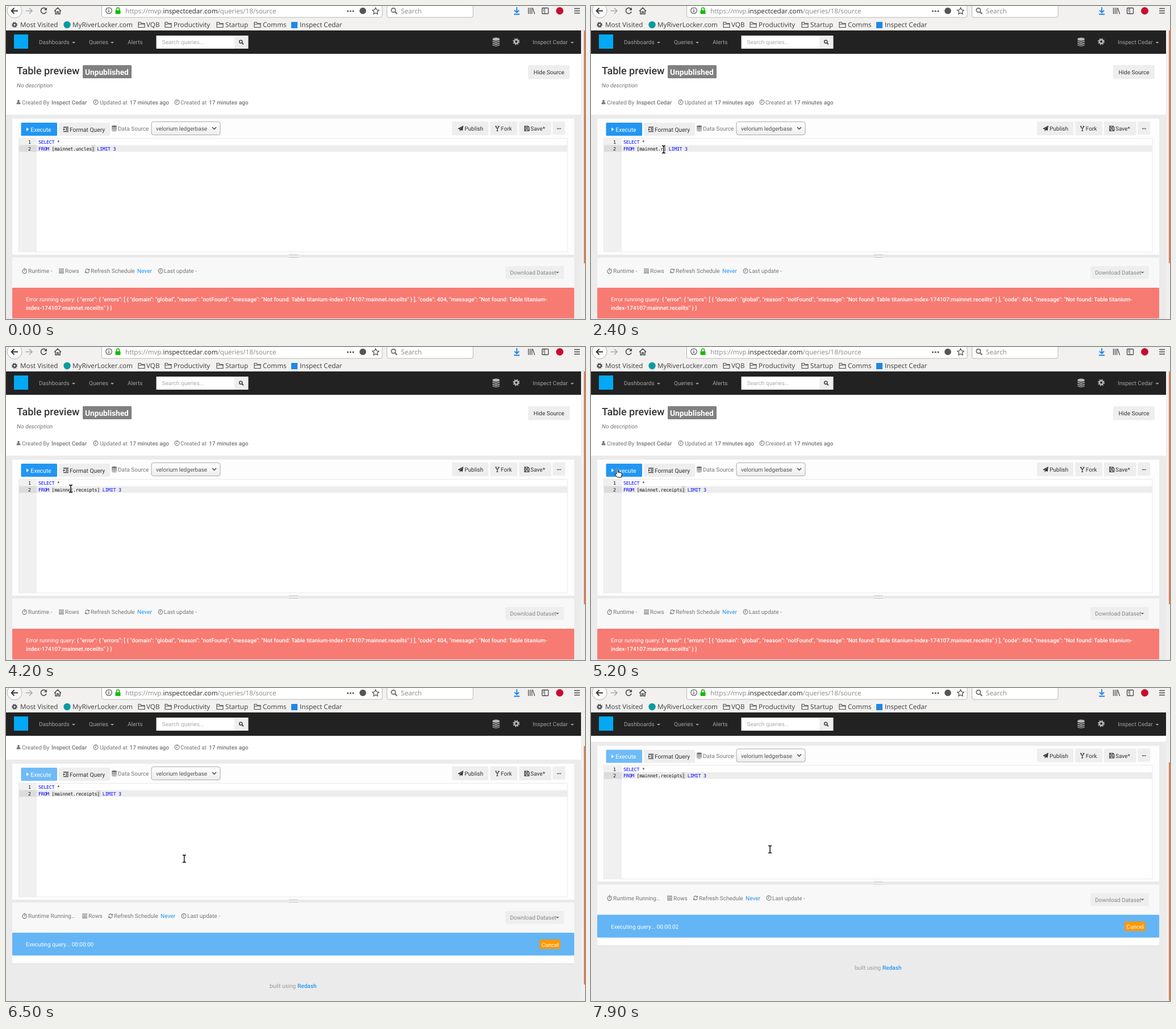
Animation of 1019x550 px, one loop 8 s. Source, as an HTML page:

```html
<!DOCTYPE html>
<html lang="en">
<head>
<meta charset="utf-8">
<title>Query editor</title>
<style>
@property --y { syntax: "<number>"; inherits: true; initial-value: 0; }
html, body { margin: 0; width: 100%; height: 100%; overflow: hidden; background: #ebebeb; }
svg { display: block; width: 100%; height: 100%; }
#stage { animation: scroll 8s step-end infinite; }
text { font: 10.02px Roboto, sans-serif; text-rendering: geometricPrecision; fill: #767676; }
.ui { font: 11.65px "Open Sans", "Noto Sans", sans-serif; fill: #3c3c3c; }
.code, .code tspan { font: 8.3px "DejaVu Sans Mono", monospace; letter-spacing: -.3px; fill: #111; white-space: pre; }
.code .kw { fill: #00f; }
.code .num { fill: #0000cd; }
.code .hit { font-weight: 700; }
.b, .err tspan { font-weight: 500; }
.dark { fill: #333; }
.blue { fill: #2196f3; }
.nav text { fill: #a0a0a0; }
.white { fill: #fff; }
.btn { fill: #eee; }
.line { fill: none; stroke: currentColor; }
.page { color: #767676; transform: translateY(calc(var(--y) * -1px)); }
.thumb { height: 409px; transform: translateY(calc(var(--y) * .907px)); }
.run .thumb { height: 419px; }
.run .idle, .busy { display: none; }
.run .busy { display: inline; }
.run .exec { fill: #6fbbf7; }
.run .shift { transform: translateX(41px); }
.mouse { animation: move 8s infinite; }
.mouse path { stroke-linejoin: round; }
@keyframes scroll {
  0% { --y: 0; }
  80% { --y: 33; }
  81.25% { --y: 65; }
  82.5% { --y: 82; }
  83.75% { --y: 91; }
  85% { --y: 95; }
  86.25%, 100% { --y: 96.5; }
}
@keyframes move {
  0% { transform: translate(1px, 26px); }
  5% { transform: translate(1px, 26px); animation-timing-function: steps(3); }
  8.75% { transform: translate(45px, 110px); animation-timing-function: steps(4); }
  13.75% { transform: translate(164px, 262px); animation-timing-function: steps(1); }
  15% { transform: translate(161px, 256px); animation-timing-function: steps(3); }
  18.75% { transform: translate(142.7px, 255px); }
  21.25% { transform: translate(142.7px, 255px); animation-timing-function: steps(4); }
  26.25% { transform: translate(128px, 252px); }
  45% { transform: translate(128px, 252px); animation-timing-function: steps(6); }
  52.5% { transform: translate(114px, 249px); animation-timing-function: steps(3); }
  56.25% { transform: translate(104px, 221px); }
  57.5% { transform: translate(104px, 221px); animation-timing-function: steps(4); }
  62.5% { transform: translate(46px, 215px); }
  68.75% { transform: translate(46px, 215px); animation-timing-function: steps(5); }
  75% { transform: translate(315px, 292px); animation-timing-function: steps(2); }
  77.5% { transform: translate(313.7px, 300px); }
  82.5% { transform: translate(313.7px, 300px); animation-timing-function: steps(2); }
  85% { transform: translate(313.7px, 295px); }
  90% { transform: translate(313.7px, 295px); animation-timing-function: steps(4); }
  95% { transform: translate(311.5px, 285px); }
  97.5% { transform: translate(311.5px, 285px); animation-timing-function: steps(1); }
  98.75%, 100% { transform: translate(315px, 283.5px); }
}
</style>
</head>
<body>
<svg id="stage" viewBox="0 0 1019 550">
<defs>
  <g id="clock"><circle r="3.9" class="line" stroke-width="1.1"/><path d="M0-2.4V.5H-2" class="line"/></g>
  <g id="db" fill="currentColor"><path d="M-4.5-3.6a4.5 1.7 0 0 1 9 0v.6a4.5 1.7 0 0 1-9 0zM-4.5-1.4q4.5 2.4 9 0v1.3q-4.5 2.6-9 0zM-4.5 1q4.5 2.4 9 0v1.3q-4.5 2.6-9 0zM-4.5 3.4q4.5 2.4 9 0v.8q-4.5 2.6-9 0z"/></g>
  <g id="folder"><path d="M-5.5 4.5v-9h4l1 2h6v7zM-5.5-1H5.5" class="line" stroke-width="1.1"/></g>
  <g id="gear"><circle r="3.2" class="line" stroke-width="2.6"/><circle r="5" class="line" stroke-width="2" stroke-dasharray="1.963"/></g>
  <path id="caret" d="M-3-1.5h6L0 1.6z" fill="currentColor"/>
  <g id="lens"><circle r="2.6" cx="-.8" cy="-.8" class="line" stroke-width="1.4"/><path d="M1.2 1.2 3.8 3.8" class="line" stroke-width="1.7"/></g>
  <path id="serifs" d="M-3-6.5q3 0 3 1.5v10q0 1.5-3 1.5M3-6.5q-3 0-3 1.5v10q0 1.5 3 1.5"/>
  <linearGradient id="sheen" x2="0" y2="1"><stop stop-color="#fff"/><stop offset="1" stop-color="#ededed"/></linearGradient>
</defs>
<rect width="1019" height="550" fill="#ebebeb"/>

<g class="page">
  <rect y="40" width="1012" height="151" fill="#fff"/>
  <text x="19" y="120.4" class="b dark" style="font-size:18px">Table preview</text>
  <rect x="135" y="104" width="86" height="23" rx="1.5" fill="#808080"/>
  <text x="139" y="121" class="white" style="font-size:13.7px;font-weight:700">Unpublished</text>
  <rect x="919" y="104" width="73" height="24.5" rx="1.5" class="btn"/>
  <text x="928.5" y="120" class="dark">Hide Source</text>
  <text x="19" y="143" style="font-style:italic">No description</text>
  <path d="M22 165a2 2 0 0 1 0 4a2 2 0 0 1 0-4M18.5 172.5q0-3.3 2-3.5h3q2 .2 2 3.5z" fill="currentColor"/>
  <text x="28" y="173">Created By</text><text x="80" y="173" class="b">Inspect Cedar</text>
  <use href="#clock" x="158" y="169"/>
  <text x="165" y="173">Updated at</text><text x="217.5" y="173" class="b">17 minutes ago</text>
  <use href="#clock" x="301" y="169"/>
  <text x="307" y="173">Created at</text><text x="357" y="173" class="b">17 minutes ago</text>

  <rect x="11" y="198" width="989" height="239" fill="#fdfdfd"/>
  <rect class="exec blue" x="26.5" y="205" width="63.5" height="23" rx="1.5"/>
  <path d="M36 213.5v6.5l4.5-3.25z" fill="#fff"/>
  <text x="43.3" y="220.5" class="white" style="font-size:10.3px">Execute</text>
  <rect x="93" y="205" width="90" height="23" rx="1.5" class="btn"/>
  <path d="M101 213h9M105 215.6h5M105 218.1h5M101 220.7h9" class="line" style="color:#333" stroke-width="1.3"/>
  <path d="M101 214.5v4.7l2.8-2.35z" fill="#333"/>
  <text x="112" y="220.5" class="dark" style="font-size:10.3px">Format Query</text>
  <use href="#db" x="190.5" y="215"/>
  <text x="197" y="219">Data Source</text>
  <rect x="256" y="203.5" width="121" height="23" rx="3.5" fill="url(#sheen)" stroke="#aaa"/>
  <text x="264" y="219" style="fill:#555">velorium ledgerbase</text>
  <path d="M363 213l3.5 3.5 3.5-3.5" class="line" style="color:#444" stroke-width="1.5"/>
  <g class="btn">
    <rect x="785" y="203" width="64" height="24" rx="1.5"/><rect x="852" y="203" width="48" height="24" rx="1.5"/>
    <rect x="903" y="203" width="56.5" height="24" rx="1.5"/><rect x="962" y="203" width="22" height="23" rx="1.5"/>
  </g>
  <g style="color:#333">
    <path d="M805 210l-10 5.5 3 1.3zM805 210l-6.5 7v3.5l1.8-2.7 3.2 1.4z" fill="currentColor"/>
    <path d="M862.3 211.5q0 2.6 2.4 3.4v4M867.1 211.5q0 2.6-2.4 3.4M861 211.3h2.6M865.8 211.3h2.6M863.4 219.3h2.6" class="line" stroke-width="1.2"/>
    <path d="M912.6 211h6l2 2v6.5h-8zM914.5 211v2.8h3.5V211M914.5 219.5v-3.3h4v3.3" class="line" stroke-width="1.2"/>
    <path d="M970 215.5h1.6M972.5 215.5h1.6M975 215.5h1.6" class="line" stroke-width="1.5"/>
  </g>
  <text x="807" y="219" class="dark">Publish</text>
  <text x="870.8" y="219" class="dark">Fork</text>
  <text x="923" y="219" class="dark">Save*</text>

  <rect x="22.5" y="232.5" width="965.5" height="199.5" fill="#fff" stroke="#e9e9e9"/>
  <rect x="23" y="233" width="31" height="199" fill="#f0f0f0"/>
  <rect x="23" y="244.5" width="31" height="11.7" fill="#dcdcdc"/>
  <rect x="54" y="244.5" width="934" height="11.7" fill="#ededed"/>
  <text class="code" x="39" y="242">1</text>
  <text class="code" x="39" y="253.5">2</text>
  <text class="code" x="57" y="242"><tspan class="kw">SELECT</tspan> *</text>
  <g id="spot">
    <rect id="match" x=".5" y="245.2" width="4.4" height="10.3" class="line" style="color:#bbb" stroke-width=".8"/>
    <path id="bar" d="M.7 245v11" class="line" style="color:#000" stroke-width="1.4"/>
  </g>
  <text class="code" x="57" y="253.5"><tspan class="kw">FROM</tspan> [mainnet.<tspan id="word">uncles</tspan>] <tspan class="kw">LIMIT</tspan> <tspan class="num">3</tspan></text>
  <g id="popup">
    <rect x="119.5" y="259" width="220" height="12" fill="#000" opacity=".13"/>
    <rect x="118.5" y="257" width="220" height="12.5" fill="#cad6fa" stroke="#c4c4cc" stroke-width=".8"/>
    <text class="code" x="123" y="266" style="fill:#444"><tspan class="hit">re</tspan>feren<tspan class="hit">c</tspan>es</text>
    <text class="code" x="301" y="266" style="fill:#808aa0">keyword</text>
  </g>

  <rect x="11" y="437" width="989" height="5" fill="#e9e9e9"/>
  <rect x="498" y="436" width="16" height="6.5" fill="#f4f4f4"/>
  <path d="M498 437.5h16M498 441.5h16" class="line" style="color:#bbb"/>
  <rect x="11" y="442" width="989" height="53" fill="#f8f8f8"/>
  <circle cx="32.5" cy="466.3" r="3.6" class="line" stroke-width="1.1"/>
  <path d="M32.5 464.3v2.2M31 461.3h3M35.3 463l1-1" class="line" stroke-width="1.1"/>
  <text x="39" y="469">Runtime <tspan class="idle">-</tspan><tspan class="busy">Running…</tspan></text>
  <g class="shift">
    <path d="M93 462.2h9M93 464.5h9M93 466.8h9M93 469.1h9" class="line" stroke-width="1.2"/>
    <text x="104" y="469">Rows</text>
    <path d="M139.8 465a3.4 3.4 0 0 1 6-1.7M146.3 466a3.4 3.4 0 0 1-6 1.7" class="line" stroke-width="1.2"/>
    <path d="M147 461.5v3.2h-3.2zM139 469.5v-3.2h3.2z" fill="currentColor"/>
    <text x="149" y="469">Refresh Schedule</text><text x="231" y="469" class="blue">Never</text>
    <use href="#clock" x="272" y="465.5"/>
    <text x="278" y="469">Last update -</text>
  </g>
  <rect x="879" y="457" width="103" height="22.5" rx="1.5" class="btn"/>
  <text x="887" y="472" style="fill:#888">Download Dataset</text>
  <use href="#caret" x="970.5" y="468.5"/>

  <g class="err idle">
    <rect x="11" y="495" width="989" height="54" rx="1.5" fill="#f77b72"/>
    <text x="35" y="519" class="white">Error running query: <tspan>{ "error": { "errors": [ { "domain": "global", "reason": "notFound", "message": "Not found: Table titanium-index-174107:mainnet.receilts" } ], "code": 404, "message": "Not found: Table titanium-</tspan></text>
    <text x="35" y="533.5" class="white"><tspan>index-174107:mainnet.receilts" } }</tspan></text>
  </g>
  <g class="busy">
    <rect x="11" y="535" width="989" height="14" fill="#fff"/>
    <path d="M11 549.5h989" class="line" style="color:#dcdcdc"/>
    <rect x="11" y="495" width="989" height="40" rx="1.5" fill="#64b5f6"/>
    <text x="35" y="519" class="white">Executing query... <tspan id="timer">00:00:00</tspan></text>
    <rect x="939" y="507" width="36.5" height="16.5" rx="1" fill="#ff9800"/>
    <text x="942.5" y="519.5" class="white">Cancel</text>
    <text x="464" y="591.5" style="fill:#999">built using</text><text x="513" y="591.5" class="blue b">Redash</text>
  </g>
</g>

<g class="nav" style="color:#a0a0a0">
  <rect y="43" width="1012" height="41" fill="#222"/>
  <rect x="14" y="50" width="25" height="25" fill="#03a9f4"/>
  <text x="58" y="67">Dashboards</text><use href="#caret" x="119" y="64.5"/>
  <text x="146" y="67">Queries</text><use href="#caret" x="187" y="64.5"/>
  <text x="214" y="67">Alerts</text>
  <rect x="264.5" y="52" width="137.5" height="23" fill="#fff"/>
  <text x="274.5" y="67" style="fill:#aaa">Search queries...</text>
  <rect x="402" y="52" width="24.5" height="23" class="btn"/>
  <use href="#lens" x="414" y="63.5" style="color:#333"/>
  <g style="color:#b5b5b5">
    <use href="#db" transform="translate(862.5 63) scale(1.4)"/>
    <use href="#gear" x="898" y="62.5"/>
  </g>
  <text x="927" y="67">Inspect Cedar</text><use href="#caret" x="996.5" y="64.5"/>
</g>
<rect x="1012" y="43" width="7" height="507" fill="#f0efee"/>
<rect class="thumb" x="1017" y="43" width="2" fill="#f07746"/>

<g style="color:#4a4a4a">
  <rect width="1019" height="43" fill="#f2f1f0"/>
  <path d="M0 42.5h1019" class="line" style="color:#e2e0de"/>
  <circle cx="15" cy="8" r="13" fill="#fbfbfb" stroke="#b4b2b0"/>
  <path d="M21 8.5H9.5M14.5 3.5l-5 5 5 5" class="line" stroke-width="1.8" style="color:#333"/>
  <path d="M34.5 8.5H46M41 3.5l5 5-5 5" class="line" stroke-width="1.6" style="color:#aaa"/>
  <path d="M70.5 5.5a5 5 0 1 0 .6 4.5" class="line" stroke-width="1.7"/><path d="M72 2.5v5h-5z" fill="currentColor"/>
  <path d="M85 9l6-6 6 6M87 8v6h2.8v-4h2.4v4H95V8" class="line" stroke-width="1.5"/>
  <rect x="168.5" y="-6" width="493.5" height="26" rx="3" fill="#fff" stroke="#bab7b4"/>
  <rect x="670.5" y="-6" width="151.5" height="26" rx="3" fill="#fff" stroke="#bab7b4"/>
  <circle cx="181" cy="8" r="5.3" class="line" stroke-width="1.1"/><path d="M181 7v4M181 4.6v1.3" class="line" stroke-width="1.4"/>
  <rect x="192.5" y="7.5" width="9" height="6.5" rx=".8" fill="#12bc00"/><path d="M194.5 8V5.5a2.5 2.5 0 0 1 5 0V8" class="line" style="color:#12bc00" stroke-width="1.6"/>
  <text class="ui" x="210" y="13" style="fill:#888">https://mvp.<tspan style="fill:#222">inspectcedar.com</tspan>/queries/18/source</text>
  <g fill="#555"><circle cx="601.5" cy="9" r="1.6"/><circle cx="606.2" cy="9" r="1.6"/><circle cx="611" cy="9" r="1.6"/><circle cx="628" cy="8.5" r="5.8"/></g>
  <path d="M650.5 3l1.8 3.8 4 .5-3 2.8.8 4.1-3.6-2-3.6 2 .8-4.1-3-2.8 4-.5z" class="line" stroke-width="1.2"/>
  <use href="#lens" transform="translate(683 8.5) scale(1.4)" style="color:#777"/>
  <text class="ui" x="695" y="13" style="fill:#888">Search</text>
  <path d="M899 2v9M895 7.5l4 4 4-4M894 14.5h10" class="line" style="color:#1a80f0" stroke-width="1.8"/>
  <path d="M919.5 3v11M922.5 3v11M925.5 3v11M927 3.5l3.5 10.5" class="line" stroke-width="1.3"/>
  <rect x="943.5" y="3.5" width="11" height="10" rx="1" class="line" stroke-width="1.3"/><path d="M948 3.5v10M945 6h2M945 8.5h2" class="line"/>
  <circle cx="974.5" cy="8.5" r="6.5" fill="#c70d2c"/>
  <path d="M1000 4.5h10M1000 8.5h10M1000 12.5h10" class="line" stroke-width="1.5"/>

  <use href="#gear" transform="translate(15 33) scale(.85)"/>
  <text class="ui" x="25" y="37">Most Visited</text>
  <circle cx="107.5" cy="33" r="6.2" fill="#0a9ba0"/>
  <text class="ui" x="117" y="37">MyRiverLocker.com</text>
  <use href="#folder" x="238.5" y="33"/><text class="ui" x="247" y="37">VQB</text>
  <use href="#folder" x="285.5" y="33"/><text class="ui" x="295" y="37">Productivity</text>
  <use href="#folder" x="376.5" y="33"/><text class="ui" x="386" y="37">Startup</text>
  <use href="#folder" x="442.5" y="33"/><text class="ui" x="452" y="37">Comms</text>
  <rect x="502" y="28" width="11" height="11" fill="#1e88e5"/>
  <text class="ui" x="517" y="37">Inspect Cedar</text>
</g>

<g class="mouse">
  <g id="beam" fill="none">
    <use href="#serifs" stroke="#fff" stroke-width="3"/>
    <use href="#serifs" stroke="#000" stroke-width="1.4"/>
  </g>
  <path id="arrow" d="M.5-.5v12.500l3-2.800 2.200 5 2-.9-2.200-4.800H9.300z" fill="#fff" stroke="#000"/>
  <path id="hand" d="M-1 8V0q1.200-1.800 2.400 0v5l5.600 1q1.500.5 1.300 2.500l-.8 5.500H.5L-4 9q0-2 3-1z" fill="#fff" stroke="#000"/>
</g>
</svg>
<script>
const LOOP = 8000, CHAR = 4.7, RUN_AT = 5500;
const $ = id => document.getElementById(id);

const typing = [
  [0, "uncles"], [1800, "uncle"], [1900, "unc"], [2000, "u"], [2100, ""],
  [2400, "r"], [2500, "re"], [2700, "rec"], [2800, "rece"],
  [3000, "recei"], [3100, "receip"], [3200, "receipt"], [3300, "receipts"]
];
const seconds = [[0, 0], [6900, 1], [7900, 2]];
const shown = {
  beam: [[1000, 2500], [3000, 4400], [5700, LOOP]],
  arrow: [[400, 1000], [2500, 3000]],
  hand: [[4400, 5700]],
  popup: [[2500, 3000]],
  match: [[0, 1800], [4700, LOOP]],
  bar: [[1800, 3500]]
};

const latest = (list, t) => list.filter(([at]) => at <= t).pop()[1];

function render(t) {
  const word = latest(typing, t);
  $("word").textContent = word;
  $("timer").textContent = "00:00:0" + latest(seconds, t);
  $("spot").setAttribute("transform", `translate(${57 + CHAR * (14 + word.length)})`);
  $("stage").classList.toggle("run", t >= RUN_AT);
  for (const id in shown) {
    const on = shown[id].some(([from, to]) => t >= from && t < to);
    $(id).style.display = on ? "" : "none";
  }
}

let start;
function tick(now) {
  start ??= now;
  render((now - start) % LOOP);
  requestAnimationFrame(tick);
}
render(0);
requestAnimationFrame(tick);
</script>
</body>
</html>
```
